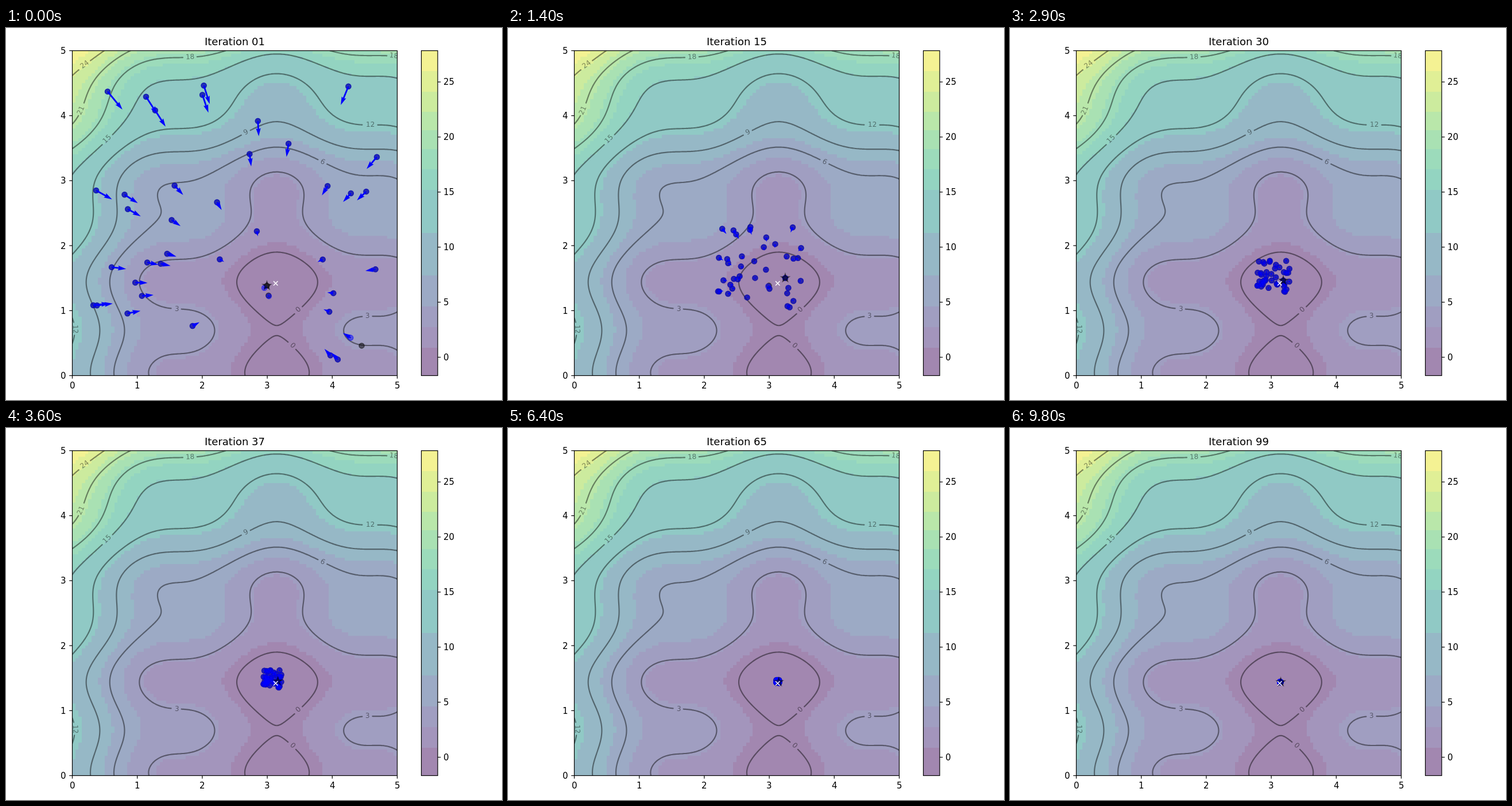
An HTML page with a canvas for the animation above (9900 ms loop, 864 px wide and 648 px high).

```html
<!DOCTYPE html>
<html lang="en">
<head>
<meta charset="utf-8">
<title>Particle swarm</title>
<style>
html, body { margin: 0; width: 100%; height: 100%; overflow: hidden; background: #fff; }
canvas { display: block; width: 864px; height: 648px; }
</style>
</head>
<body>
<canvas id="stage" width="864" height="648"></canvas>
<script>
const W = 864, H = 648, STEP = 100, FRAMES = 99, COUNT = 40;
const box = { x: 115.5, y: 39.5, size: 566 };
const unit = box.size / 5;
const bar = { x: 723, w: 29, lo: -1.65, hi: 27.84 };
const FONT = '"DejaVu Sans", Verdana, sans-serif';

const toX = x => box.x + x * unit;
const toY = y => box.y + box.size - y * unit;
const toPx = ([x, y]) => [toX(x), toY(y)];

// Objective function: a bowl in each direction plus a ripple.
const fx = x => (x - 3.195) ** 2 + Math.sin(3 * x + 1.59);
const fy = y => (y - 0.905) ** 2 + Math.sin(4 * y - 1.31);
const cost = ([x, y]) => fx(x) + fy(y);
const slope = (f, v) => (f(v + 1e-3) - f(v - 1e-3)) / 2e-3;

// Piecewise linear curve through a few key points.
function curve(keys, t) {
  const i = Math.max(1, keys.findIndex(k => k[0] >= t));
  const [t0, v0] = keys[i - 1], [t1, v1] = keys[i];
  return v0 + (v1 - v0) * (t - t0) / (t1 - t0);
}

// Colour scale: viridis at half strength on white, in bands.
const ramp = ['440154', '472d7b', '3b528b', '2c728e', '21918c',
  '28ae80', '5ec962', 'addc30', 'fde725']
  .map(h => [0, 2, 4].map(i => parseInt(h.slice(i, i + 2), 16)));
const edges = [bar.lo, 0.86, 2.75, 4.6, 7.45, 11.3, 15.2, 17.1, 18.9,
  20.6, 22.3, 24.1, 26, bar.hi];

function viridis(t) {
  const p = t * (ramp.length - 1), i = Math.floor(p);
  const rgb = ramp[i].map((c, n) =>
    Math.round((c + (ramp[i + 1][n] - c) * (p - i) + 255) / 2));
  return `rgb(${rgb})`;
}

const bands = edges.slice(1).map((hi, i) => ({
  lo: edges[i], hi,
  color: viridis(((edges[i] + hi) / 2 - bar.lo) / (bar.hi - bar.lo))
}));
const bandColor = v => (bands.find(b => v < b.hi) || bands[bands.length - 1]).color;

// Contour labels: level and centre; the tilt follows the contour.
const labels = [
  [24, 137, 63], [18, 321, 50], [18, 676, 48], [21, 130, 143], [15, 176, 193],
  [12, 635, 168], [9, 418, 181], [6, 552, 233], [3, 298, 489], [3, 630, 501],
  [0, 509, 490], [0, 500, 553], [12, 121, 525]
];

function tilt(px, py) {
  const x = (px - box.x) / unit, y = (box.y + box.size - py) / unit;
  return Math.atan(slope(fx, x) / slope(fy, y));
}

// Text on whole pixels; align is the share of the width left of x.
function text(g, str, x, y, size, align = 0.5) {
  g.font = `${size}px ${FONT}`;
  g.fillText(str, Math.round(x - g.measureText(str).width * align), Math.round(y));
}

function line(g, x1, y1, x2, y2) {
  g.beginPath();
  g.moveTo(x1, y1);
  g.lineTo(x2, y2);
  g.stroke();
}

function drawField(g) {
  const n = 100, cut = i => Math.round(i * box.size / n);
  for (let j = 0; j < n; j++) {
    for (let i = 0; i < n; i++) {
      g.fillStyle = bandColor(cost([i * 5 / (n - 1), j * 5 / (n - 1)]));
      g.fillRect(115 + cut(i), 605 - cut(j + 1), cut(i + 1) - cut(i), cut(j + 1) - cut(j));
    }
  }
}

// Marching squares, leaving a gap around each label.
function drawContours(g) {
  const n = 250, d = 5 / n;
  const gx = [], gy = [];
  for (let i = 0; i <= n; i++) {
    gx.push(fx(i * d));
    gy.push(fy(i * d));
  }
  g.beginPath();
  for (let level = 0; level <= 24; level += 3) {
    const gaps = labels.filter(l => l[0] === level);
    const gap = level > 9 ? 12.6 : 8.8;
    for (let j = 0; j < n; j++) {
      for (let i = 0; i < n; i++) {
        const corners = [[i, j], [i + 1, j], [i + 1, j + 1], [i, j + 1]]
          .map(([a, b]) => [a, b, gx[a] + gy[b] - level]);
        const hits = [];
        corners.forEach((p, k) => {
          const q = corners[(k + 1) % 4];
          if (p[2] < 0 === q[2] < 0) return;
          const t = p[2] / (p[2] - q[2]);
          hits.push(toPx([(p[0] + (q[0] - p[0]) * t) * d, (p[1] + (q[1] - p[1]) * t) * d]));
        });
        for (let k = 0; k + 1 < hits.length; k += 2) {
          const [a, b] = [hits[k], hits[k + 1]];
          if (gaps.some(l => Math.hypot(a[0] - l[1], a[1] - l[2]) < gap)) continue;
          g.moveTo(...a);
          g.lineTo(...b);
        }
      }
    }
  }
  g.strokeStyle = g.fillStyle = 'rgba(0,0,0,.45)';
  g.lineWidth = 2.2;
  g.lineCap = 'round';
  g.stroke();
  g.lineCap = 'butt';
  for (const [level, x, y] of labels) {
    g.save();
    g.translate(x, y);
    g.rotate(tilt(x, y));
    text(g, level, 0, 4.4, 12);
    g.restore();
  }
}

function drawAxes(g) {
  const bottom = box.y + box.size, barY = v => 573.5 - v * 19.18;
  for (const b of bands) {
    const top = Math.round(barY(b.hi));
    g.fillStyle = b.color;
    g.fillRect(bar.x, top, bar.w, Math.round(barY(b.lo)) - top);
  }
  g.strokeStyle = g.fillStyle = '#000';
  g.lineWidth = 1.2;
  g.strokeRect(box.x, box.y, box.size, box.size);
  g.strokeRect(bar.x + 0.5, box.y, bar.w - 0.5, box.size);
  for (let i = 0; i <= 5; i++) {
    line(g, toX(i), bottom, toX(i), bottom + 5.25);
    line(g, box.x - 5.25, toY(i), box.x, toY(i));
    text(g, i, toX(i), 628, 15);
    text(g, i, 105, toY(i) + 5.4, 15, 1);
    line(g, bar.x + bar.w, barY(i * 5), bar.x + bar.w + 5.25, barY(i * 5));
    text(g, i * 5, 762, barY(i * 5) + 5.4, 15, 0);
  }
}

function makeBackdrop() {
  const c = document.createElement('canvas');
  c.width = W;
  c.height = H;
  const g = c.getContext('2d');
  g.fillStyle = '#fff';
  g.fillRect(0, 0, W, H);
  drawField(g);
  g.save();
  g.beginPath();
  g.rect(box.x, box.y, box.size, box.size);
  g.clip();
  drawContours(g);
  g.restore();
  drawAxes(g);
  return c;
}

// Mersenne Twister giving doubles in [0, 1).
function twister(seed) {
  const n = 624, mt = new Uint32Array(n);
  mt[0] = seed;
  for (let i = 1; i < n; i++) {
    mt[i] = Math.imul(1812433253, mt[i - 1] ^ (mt[i - 1] >>> 30)) + i;
  }
  let pos = n;
  function next() {
    if (pos === n) {
      for (let k = 0; k < n; k++) {
        const y = (mt[k] & 0x80000000) | (mt[(k + 1) % n] & 0x7fffffff);
        mt[k] = mt[(k + 397) % n] ^ (y >>> 1) ^ (y & 1 ? 0x9908b0df : 0);
      }
      pos = 0;
    }
    let y = mt[pos++];
    y ^= y >>> 11;
    y ^= (y << 7) & 0x9d2c5680;
    y ^= (y << 15) & 0xefc60000;
    y ^= y >>> 18;
    return y >>> 0;
  }
  return () => {
    const hi = next() >>> 5, lo = next() >>> 6;
    return (hi * 67108864 + lo) / 2 ** 53;
  };
}

// Normal deviates by the polar method, two per draw.
function gaussian(rand) {
  let spare = null;
  return () => {
    if (spare !== null) {
      const v = spare;
      spare = null;
      return v;
    }
    let a, b, r;
    do {
      a = 2 * rand() - 1;
      b = 2 * rand() - 1;
      r = a * a + b * b;
    } while (r >= 1 || r === 0);
    const f = Math.sqrt(-2 * Math.log(r) / r);
    spare = f * a;
    return f * b;
  };
}

const rand = twister(100), randn = gaussian(rand);
const fill = fn => Array.from({ length: COUNT }, fn);
const pairs = fn => {
  const xs = fill(fn), ys = fill(fn);
  return xs.map((x, i) => [x, ys[i]]);
};
const born = pairs(() => rand() * 5);
const kicks = pairs(() => randn() * 0.026);

const best = pts => pts.reduce((a, b) => cost(b) < cost(a) ? b : a);
const first = best(born), goal = [3.14, 1.438];

// The swarm shrinks toward a focus that later drifts to the minimum.
const decay = [[-1, -0.093], [8, 0.707], [14, 1.224], [29, 2.176], [46, 3.594], [99, 6.2]];

function pose(k) {
  const s = 0.883 * Math.exp(-curve(decay, k));
  const drift = 1 - Math.exp(-Math.max(0, k - 14) / 12);
  return born.map((p, i) => p.map((v, n) => {
    const focus = first[n] + (goal[n] - first[n]) * drift;
    return focus + (v + kicks[i][n] - focus) * s;
  }));
}

// Each state keeps the best place every particle has visited.
const states = [];
for (let k = 0, memory = born; k < FRAMES; k++) {
  const pts = pose(k);
  memory = memory.map((old, i) => cost(old) < cost(pts[i]) ? old : pts[i]);
  states.push({
    pts: pts.map(toPx), prev: pose(k - 1).map(toPx),
    memory: memory.map(toPx), leader: toPx(best(memory))
  });
}

function paint(g, color) {
  g.fillStyle = g.strokeStyle = color;
  g.lineWidth = 1.5;
  g.fill();
  g.stroke();
}

function dot(g, [x, y], color) {
  g.beginPath();
  g.arc(x, y, 4.5, 0, 7);
  paint(g, color);
}

function arrow(g, [x, y], dx, dy) {
  const w = 2.83, len = Math.hypot(dx, dy);
  g.beginPath();
  if (len < w) {
    g.arc(x, y, w / 2, 0, 7);
    g.fill();
    return;
  }
  const k = w * Math.min(1, len / (5 * w));
  g.save();
  g.translate(x, y);
  g.rotate(Math.atan2(dy, dx));
  g.moveTo(0, -k / 2);
  g.lineTo(len - 4.5 * k, -k / 2);
  g.lineTo(len - 5 * k, -1.5 * k);
  g.lineTo(len, 0);
  g.lineTo(len - 5 * k, 1.5 * k);
  g.lineTo(len - 4.5 * k, k / 2);
  g.lineTo(0, k / 2);
  g.fill();
  g.restore();
}

function star(g, [x, y]) {
  g.beginPath();
  for (let i = 0; i < 10; i++) {
    const r = i % 2 ? 2.86 : 7.5, a = i * Math.PI / 5;
    g.lineTo(x + r * Math.sin(a), y - r * Math.cos(a));
  }
  g.closePath();
  paint(g, 'rgba(0,0,0,.5)');
}

const ctx = document.getElementById('stage').getContext('2d');
const backdrop = makeBackdrop();

function draw(k) {
  const { pts, prev, memory, leader } = states[k];
  ctx.drawImage(backdrop, 0, 0);
  ctx.fillStyle = '#000';
  text(ctx, 'Iteration ' + String(k + 1).padStart(2, '0'), 398.5, 30, 18);
  memory.forEach(p => dot(ctx, p, 'rgba(0,0,0,.5)'));
  pts.forEach(p => dot(ctx, p, 'rgba(0,0,255,.5)'));
  ctx.fillStyle = '#00f';
  pts.forEach((p, i) => arrow(ctx, p, p[0] - prev[i][0], p[1] - prev[i][1]));
  star(ctx, leader);
  ctx.strokeStyle = '#fff';
  ctx.lineWidth = 1.5;
  line(ctx, 466, 441, 473.5, 448.5);
  line(ctx, 466, 448.5, 473.5, 441);
}

const start = performance.now();
let shown = -1;
function tick() {
  const k = Math.floor((performance.now() - start) / STEP) % FRAMES;
  if (k !== shown) draw(shown = k);
  requestAnimationFrame(tick);
}
tick();
</script>
</body>
</html>
```
